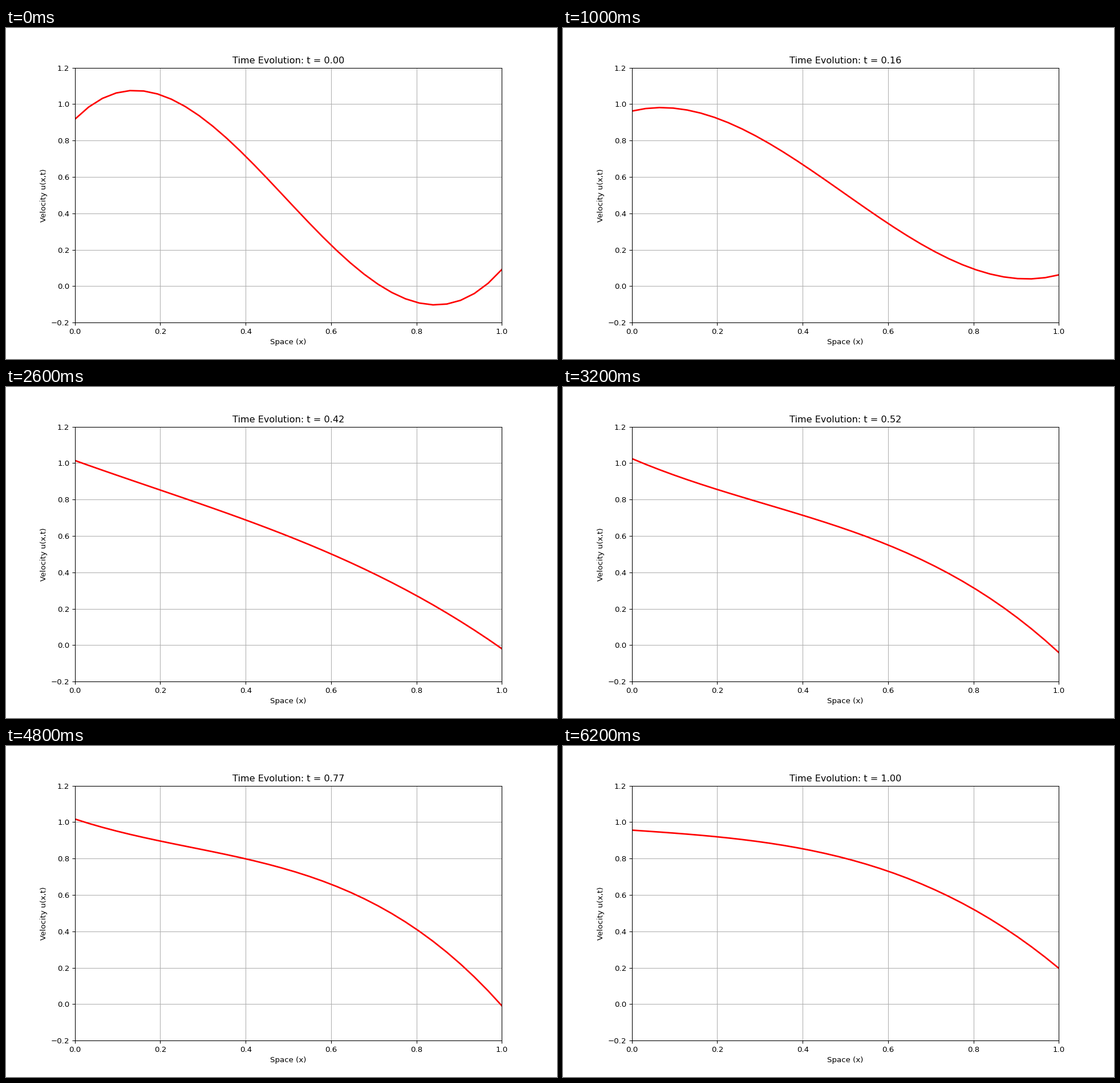
Write a matplotlib script that moves like this. It is 966 by 580 pixels and loops after 6400 ms.

```python
import numpy as np
import matplotlib.pyplot as plt
from matplotlib.animation import FuncAnimation

plt.rcParams["font.family"] = "DejaVu Sans"

DPI = 96.6
STEPS = 32

x = np.linspace(0, 1, STEPS)
times = np.linspace(0, 1, STEPS)


def velocity(t):
    """Cubic wave profile about the centre, steepening and drifting with t."""
    s = 2 * x - 1
    level = 0.468 + 0.1698 * t + 0.4632 * t**2 - 0.3 * t**3
    slope = -1.2525 + 3.2575 * t - 3.99 * t**2 + 1.68 * t**3
    bend = 0.0365 - 0.0516 * t - 0.9844 * t**2 + 0.775 * t**3
    swing = 0.84 - 3.4333 * t + 3.5371 * t**2 - 1.0183 * t**3
    return level + slope * s + bend * s**2 + swing * s**3


fig, ax = plt.subplots(figsize=(10, 580 / DPI), dpi=DPI)
line, = ax.plot(x, velocity(0), color="red", lw=2)
ax.set_xlim(0, 1)
ax.set_ylim(-0.2, 1.2)
ax.set_xlabel("Space (x)")
ax.set_ylabel("Velocity u(x,t)")
ax.grid(True)
title = ax.set_title("")


def update(step):
    t = times[step]
    line.set_ydata(velocity(t))
    title.set_text(f"Time Evolution: t = {t:.2f}")
    return line, title


anim = FuncAnimation(fig, update, frames=STEPS, interval=200, repeat=True,
                     repeat_delay=0, blit=False)
plt.show()
```
